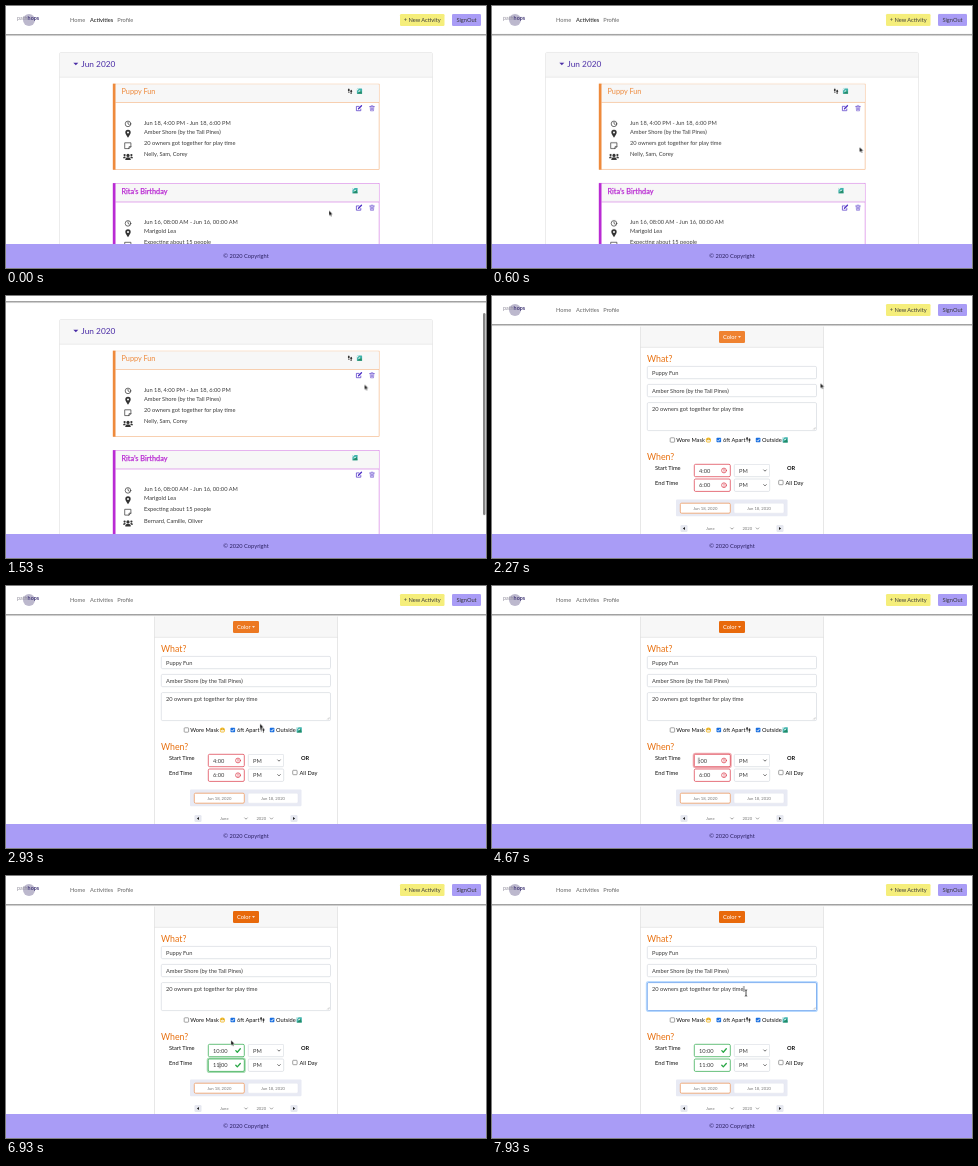
An HTML page that plays this animation: 480 by 262 pixels, repeating every 8000 ms.

```html
<!DOCTYPE html>
<html lang="en">
<head>
<meta charset="utf-8">
<title>Activity planner</title>
<style>
html, body { margin: 0; width: 100%; height: 100%; overflow: hidden; background: #fff; }
svg { display: block; width: 100vw; height: 100vh; }
text { font: 5.7px Lato, sans-serif; fill: #3a3a3a; }
.nav { fill: #666; }
.on { fill: #111; }
.title { font-size: 7.3px; fill: currentColor; }
.strong { stroke: currentColor; stroke-width: .25px; }
.bold { font-weight: 700; }
.month { font-size: 8.3px; fill: #4a2ca6; }
.head { font-size: 8.8px; fill: #e8700f; }
.tiny { font-size: 4.2px; fill: #777; }
.white { fill: #fff; }
.mid { text-anchor: middle; }
.box { fill: #fff; stroke: #ced4da; stroke-width: .6; }
.line { fill: none; stroke: currentColor; stroke-width: .7; stroke-linecap: round; stroke-linejoin: round; }
.fine { stroke-width: .5; }
.thick { stroke-width: 1.3; }
</style>
</head>
<body>
<svg viewBox="0 0 480 262">
  <defs>
    <linearGradient id="shade" x2="0" y2="1">
      <stop stop-color="#8c8c8c"/><stop offset="1" stop-color="#fff"/>
    </linearGradient>
    <g id="clock" class="line"><circle r="2.8"/><path d="M0-1.6V0L1.3.8"/></g>
    <path id="pin" fill="currentColor" fill-rule="evenodd" d="M0 4C-1 2.2-2.7.6-2.7-1.2a2.7 2.7 0 0 1 5.4 0C2.7.6 1 2.2 0 4ZM-1-1.2a1 1 0 1 0 2 0a1 1 0 1 0-2 0Z"/>
    <path id="note" class="line" d="M-2.9-2.9H2.9V1L1 2.9H-2.9ZM1 2.9V1H2.9"/>
    <g id="people" fill="currentColor">
      <circle cy="-1.3" r="1.6"/><path d="M-2.7 3.2V2.2Q-2.5.6 0 .6T2.7 2.2V3.2Z"/>
      <circle cx="-3.4" cy="-1.6" r="1.1"/><circle cx="3.4" cy="-1.6" r="1.1"/>
      <path d="M-5 1.6Q-5-.1-3.4-.1Q-2.5-.1-2.1.3L-3.1 1.6ZM5 1.6Q5-.1 3.4-.1Q2.5-.1 2.1.3L3.1 1.6Z"/>
    </g>
    <g id="edit" class="line"><path d="M1.8.8V2.5H-2.6V-1.8H0"/><path class="thick" d="M-.5.6L2.5-2.4"/></g>
    <path id="trash" class="line fine" d="M-2.3-1.7H2.3M-.8-2.5H.8M-1.8-1.7L-1.5 2.6H1.5L1.8-1.7M-.5-.5V1.5M.5-.5V1.5"/>
    <g id="feet" fill="#333"><ellipse cx="-1.2" cy="-1" rx=".9" ry="1.5"/><circle cx="-1.1" cy="1.3" r=".6"/><ellipse cx="1.2" cy=".2" rx=".9" ry="1.5"/><circle cx="1.1" cy="2.4" r=".6"/></g>
    <g id="scene"><rect x="-2.6" y="-2.6" width="5.2" height="5.2" rx=".4" fill="#3fb3ad"/><path d="M-2.6-2.6H-.4L-2.6-.2Z" fill="#e8f5f2"/><path d="M-2.6 2.6L1.6-.8L2.6 2.6Z" fill="#238b68"/><path d="M-1.9.5L.4-1.2L1 .2Z" fill="#d9efe3"/></g>
    <g id="mask"><circle r="2.6" fill="#f4bd2f"/><path d="M-1.9.1Q0-.7 1.9.1L1.3 1.7H-1.3Z" fill="#f5ead0"/><path d="M-1.2-.8H-.7M.7-.8H1.2" stroke="#5d430d" stroke-width=".6"/></g>
    <path id="chevron" class="line" d="M-1.3-.6L0 .7L1.3-.6"/>
  </defs>
  <rect width="480" height="262" fill="#fff"/>
  <g id="list"></g>
  <g id="form"></g>
  <rect id="bar" x="477" y="1" width="2.5" height="202" rx="1.2" fill="#858585"/>
  <rect y="238" width="480" height="24" fill="#a99cf6"/>
  <text class="mid" x="240" y="252" style="fill:#2b2160">© 2020 Copyright</text>
  <g id="mouse">
    <path id="arrow" d="M0 0V5.2L1.2 4.2L2 6L3 5.6L2.2 3.8H3.8Z" fill="#111" stroke="#fff" stroke-width=".4"/>
    <path id="beam" d="M-1.2-3.2Q0-3.2 0-2.4Q0-3.2 1.2-3.2M0-2.4V2.4M-1.2 3.2Q0 3.2 0 2.4Q0 3.2 1.2 3.2" fill="none" stroke="#222" stroke-width=".8"/>
  </g>
</svg>
<script>
const LOOP = 8000, RED = '#dc3545', GREEN = '#28a745';
const $ = id => document.getElementById(id);

// Markup helpers
const text = (x, y, s, cls = '', id = '') => `<text x="${x}" y="${y}" class="${cls}" id="${id}">${s}</text>`;
const icon = (name, x, y, color = '#333') => `<use href="#${name}" x="${x}" y="${y}" color="${color}"/>`;
const box = (x, y, w, h, extra = 'class="box"', r = 1.3) =>
  `<rect x="${x}" y="${y}" width="${w}" height="${h}" rx="${r}" ${extra}/>`;
const caret = (x, y, w = 2, fill = '#fff') => `<path d="M${x - w} ${y - w / 2}H${x + w}L${x} ${y + w / 2}Z" fill="${fill}"/>`;

const header = active => `
  <rect width="480" height="28" fill="#fff"/>
  <rect y="28" width="480" height="2.6" fill="url(#shade)"/>
  <circle cx="23" cy="14" r="6" fill="#bcb8cd"/>
  <text x="11" y="14.2" style="font-size:5.4px;fill:#8d8a99">path<tspan class="bold" fill="#443a78">hops</tspan></text>
  ${text(64, 16, 'Home', 'nav')}${text(84, 16, 'Activities', active ? 'on' : 'nav')}${text(111.3, 16, 'Profile', 'nav')}
  ${box(394, 8, 44.5, 12, 'fill="#f5ee7b"')}${text(416.2, 16, '+ New Activity', 'mid')}
  ${box(446, 8, 29, 12, 'fill="#a99cf6"')}${text(460.5, 16, 'SignOut', 'mid')}`;

const card = (y, color, title, cls, badges, lines) => `
  <g transform="translate(0 ${y})" color="${color}">
    <rect x="107.3" y=".4" width="265.8" height="85.4" fill="#fff" stroke="currentColor" stroke-width=".5" stroke-opacity=".8"/>
    <rect x="109.5" y=".7" width="263.3" height="18" fill="#f7f7f7"/>
    <path d="M109.5 18.8H373" stroke="currentColor" stroke-width=".5" stroke-opacity=".8"/>
    <rect x="106.8" width="2.7" height="86" fill="currentColor"/>
    ${text(115.5, 10.8, title, 'title ' + cls)}${badges}
    ${icon('edit', 353, 24.5, '#4a2bc4')}${icon('trash', 366, 24.5, '#4a2bc4')}
    ${['clock', 'pin', 'note', 'people'].map((n, i) => icon(n, 122, [40.2, 50, 62, 73][i])).join('')}
    ${lines.map((s, i) => text(138, [40.9, 50.2, 61.2, 72.8][i], s)).join('')}
  </g>`;

$('list').innerHTML = header(true) + `
  <rect x="53.5" y="46.5" width="373" height="260" rx="1.5" fill="#fff" stroke="#dfdfdf" stroke-width=".6"/>
  <path d="M54 47H426V71H54Z" fill="#f7f7f7"/><path d="M53.5 71.2H426.5" stroke="#dfdfdf" stroke-width=".6"/>
  ${caret(69.8, 58, 2.5, '#4a2ca6')}${text(75.3, 61, 'Jun 2020', 'month')}` +
  card(77.7, '#ee8a3c', 'Puppy Fun', '', icon('feet', 344, 7.3) + icon('scene', 353.5, 7.5),
    ['Jun 18, 4:00 PM - Jun 18, 6:00 PM', 'Amber Shore (by the Tall Pines)', '20 owners got together for play time', 'Nelly, Sam, Corey']) +
  card(177.2, '#b92bd3', 'Rita’s Birthday', 'strong', icon('scene', 349, 7.5),
    ['Jun 16, 08:00 AM - Jun 16, 00:00 AM', 'Marigold Lea', 'Expecting about 15 people', 'Bernard, Camille, Oliver']);

const check = (x, y, on) => on
  ? box(x, y, 4.6, 4.6, 'fill="#1a6fe0"', .7) + `<path d="M${x + 1} ${y + 2.4}l1 1.1l1.7-2.3" fill="none" stroke="#fff" stroke-width=".8"/>`
  : box(x, y, 4.4, 4.4, 'fill="#fff" stroke="#666" stroke-width=".6"', .7);

const timeField = (id, label, y, values) => `
  ${text(163, y + 6, label, 'on')}
  <g id="${id}" color="${RED}">
    ${box(201.7, y - .3, 37.1, 13.6, `id="${id}Glow" fill="none" stroke="currentColor" stroke-opacity=".4" stroke-width="2"`, 1.8)}
    ${box(202.3, y + .3, 36, 12.4, 'fill="#fff" stroke="currentColor" stroke-width=".7"')}
    <g id="${id}Bad"><circle class="line" cx="232" cy="${y + 6.5}" r="2.4"/><path class="line" d="M232 ${y + 5.2}v1.4m0 1.2v.1"/></g>
    <path id="${id}Good" class="line thick" d="M229.8 ${y + 6.6}l1.5 1.6l3-3.4"/>
  </g>
  ${values.map((s, i) => text(207, y + 8.6, s, '', id + i)).join('')}
  <path id="${id}Caret" d="M0 ${y + 3.6}v6" stroke="#111" stroke-width=".6"/>
  ${box(242.3, y + .3, 35.4, 12.4)}${text(247, y + 8.6, 'PM')}${icon('chevron', 273, y + 6.5)}`;

$('form').innerHTML = `<rect width="480" height="262" fill="#fff"/>
  <rect x="148.5" y="29" width="183" height="240" fill="#fff" stroke="#d8d8d8" stroke-width=".6"/>
  <rect x="149" y="29" width="182" height="22" fill="#f7f7f7"/><path d="M148.5 51.3H331.5" stroke="#d8d8d8" stroke-width=".6"/>
  ${header(false)}
  ${box(227, 35, 26, 12, 'id="color" fill="#e8690b"')}${text(231, 43, 'Color', 'white')}${caret(247.5, 41, 1.5)}
  ${text(155, 66.2, 'What?', 'head')}
  ${box(155.3, 70.4, 169.2, 12.3)}${text(160, 78.7, 'Puppy Fun')}
  ${box(155.3, 88.4, 169.2, 12.3)}${text(160, 96.7, 'Amber Shore (by the Tall Pines)')}
  ${box(155.3, 106.6, 169.2, 28)}
  <g id="noteFocus">${box(154.8, 106.1, 170.2, 29, 'fill="none" stroke="#bcdcff" stroke-width="2"', 1.8)}
    ${box(155.3, 106.6, 169.2, 28, 'fill="#fff" stroke="#6fa4ec" stroke-width=".8"')}</g>
  ${text(160, 115, '20 owners got together for play time', '', 'noteText')}
  <path id="noteCaret" d="M0 110v6" stroke="#111" stroke-width=".6"/>
  <path d="M321.3 133.4l2-2M322.6 133.4l.8-.8" stroke="#777" stroke-width=".4"/>
  ${check(178.2, 141.8)}${text(184.2, 146.2, 'Wore Mask', 'on')}${icon('mask', 216.4, 144)}
  ${check(224.5, 141.7, 1)}${text(231, 146.2, '6ft Apart', 'on')}${icon('feet', 256.3, 143.5)}
  ${check(263.8, 141.7, 1)}${text(270, 146.2, 'Outside', 'on')}${icon('scene', 293.2, 143.8)}
  ${text(155, 164.2, 'When?', 'head')}
  ${timeField('start', 'Start Time', 168, ['4:00', ':00', '1:00', '10:00'])}
  ${timeField('end', 'End Time', 182.7, ['6:00', ':00', '1:00', '11:00'])}
  ${text(295, 174.3, 'OR', 'on bold')}${check(286.7, 184.3)}${text(293.5, 188.7, 'All Day', 'on')}
  ${box(184, 203.5, 111.5, 16.8, 'fill="#e8eaf4"', 1)}
  ${box(188.3, 207.2, 50, 10, 'fill="#fff" stroke="#ee9b62" stroke-width=".8"')}${text(213.3, 213.6, 'Jun 18, 2020', 'tiny mid')}
  ${box(242, 207.2, 50, 10, 'fill="#fff" stroke="#e0e2ec" stroke-width=".5"')}${text(267, 213.6, 'Jun 18, 2020', 'tiny mid')}
  ${box(188.5, 229, 7, 7, 'fill="#e6e8f0"')}${box(284.5, 229, 7, 7, 'fill="#e6e8f0"')}
  <path d="M190.8 232.5l2.2-1.5v3ZM289.2 232.5l-2.2-1.5v3Z" fill="#222"/>
  ${text(218.3, 234, 'June', 'tiny on mid')}${icon('chevron', 240, 232.5, '#777')}
  ${text(255.3, 234, '2020', 'tiny on mid')}${icon('chevron', 265.5, 232.5, '#777')}`;

// Motion helpers: a step is [ms, value, easing until the next step]
const now = document.timeline.currentTime || 0;
function play(id, prop, steps, easing = 'step-end') {
  const last = steps[steps.length - 1];
  const frames = [...steps, [LOOP, last[1]]].map(([ms, value, ease = easing]) =>
    ({ offset: ms / LOOP, [prop]: value, easing: ease }));
  $(id).animate(frames, { duration: LOOP, iterations: Infinity }).startTime = now;
}
function show(id, from, to = LOOP, fade = 0) {
  const steps = from ? [[0, 0], [from, 0, 'linear'], [from + fade, 1]] : [[0, 1]];
  if (to < LOOP) steps.push([to, 1, 'linear'], [to + fade, 0]);
  play(id, 'opacity', steps);
}
const move = (id, points, easing) =>
  play(id, 'transform', points.map(([ms, x, y, ease]) => [ms, `translate(${x}px, ${y}px)`, ease]), easing);

const scroll = [[0, 0], [600, 0], [800, 19.5, 'ease-out'], [1000, 23]];
move('list', scroll.map(([ms, d, ease]) => [ms, 0, -d, ease]), 'linear');
move('bar', scroll.map(([ms, d, ease]) => [ms, 0, d * .7, ease]), 'linear');
show('bar', 600, 1750, 150);
show('list', 0, 2070);
show('form', 2070);
play('color', 'fill', [[0, '#ef8230'], [2850, '#ef8230'], [3050, '#e8690b']], 'linear');

function fillIn(id, focus, blur, changes, valid, carets) {
  const times = [0, ...changes, LOOP];
  changes.concat(LOOP).forEach((_, i) => show(id + i, times[i], times[i + 1]));
  show(id + 'Glow', focus, blur, 130);
  show(id + 'Caret', focus, blur);
  move(id + 'Caret', [[0, carets[0], 0], ...changes.map((ms, i) => [ms, carets[i + 1], 0])]);
  play(id, 'color', [[0, RED], [valid, RED], [valid + 130, GREEN]], 'linear');
  show(id + 'Bad', 0, valid, 100);
  show(id + 'Good', valid, LOOP, 100);
}
fillIn('start', 3670, 5650, [4200, 4740, 4940], 4940, [210.4, 206.8, 210.4, 213.7]);
fillIn('end', 5650, 7470, [5870, 6330, 6400], 6330, [210.4, 206.8, 210.4, 213.7]);

show('noteFocus', 7470, LOOP, 150);
show('noteCaret', 7470);
const noteEnd = 160.4 + $('noteText').getComputedTextLength();
move('noteCaret', [[0, noteEnd, 0]]);

move('mouse', [
  [0, 323, 204.5], [70, 323, 204.5], [130, 367.5, 141], [1200, 367.5, 141, 'ease-in-out'],
  [1530, 358.5, 88.5, 'ease-out'], [1930, 352.5, 79], [2070, 352.5, 79, 'ease-in-out'],
  [2600, 272, 106], [2800, 272, 106], [2930, 254, 137.5, 'ease-out'], [3600, 208.5, 177],
  [5530, 208.5, 177], [5650, 209, 199], [5800, 209, 190], [6600, 209, 190, 'ease-in-out'], [7400, 254, 117]
], 'linear');
play('mouse', 'opacity', [[0, 1], [4200, 0], [5530, 1], [6330, 0], [6600, 1]]);
const pointer = [[0, 0], [3450, 1], [6750, 0], [7220, 1]];
play('beam', 'opacity', pointer);
play('arrow', 'opacity', pointer.map(([ms, v]) => [ms, 1 - v]));
</script>
</body>
</html>
```
